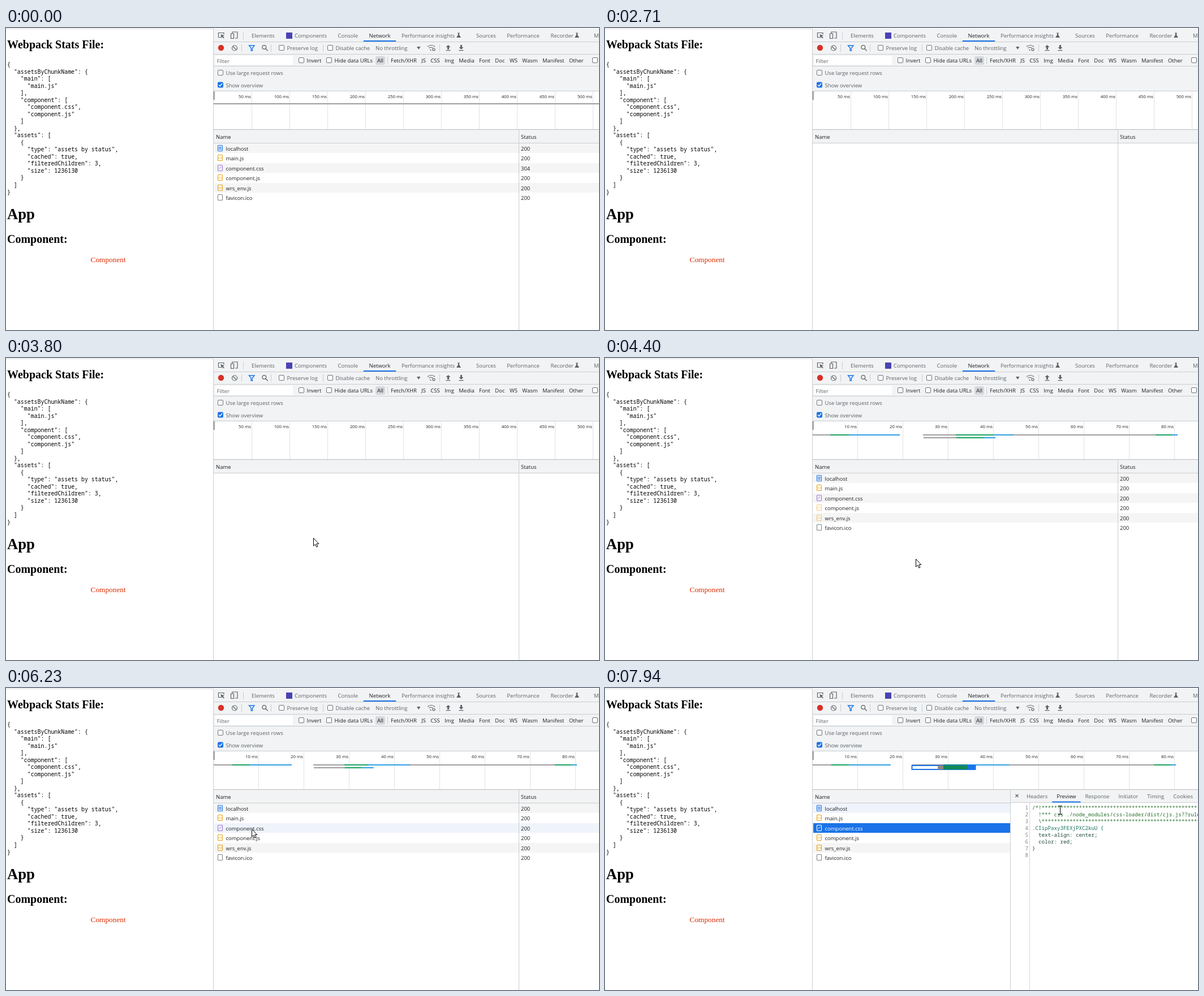
An HTML page that plays this animation: 1048 by 534 pixels, repeating every 8000 ms.

```html
<!DOCTYPE html>
<html lang="en">
<head>
<meta charset="utf-8">
<title>Network panel</title>
<style>
  html, body { margin: 0; width: 100%; height: 100%; overflow: hidden; background: #fff; }
  svg { display: block; }
  text { font: 9.5px "Open Sans", "Noto Sans", "DejaVu Sans", sans-serif; fill: #202124; }
  .serif { font-family: "Liberation Serif", serif; fill: #000; }
  .h1 { font-size: 26.67px; font-weight: bold; }
  .h2 { font-size: 20px; font-weight: bold; }
  .red { font-size: 13.33px; fill: #dd2c00; }
  .mono { font: 9.93px "Noto Sans Mono", "DejaVu Sans Mono", monospace; fill: #000; }
  .code { font-size: 9.17px; }
  .comment { fill: #236e25; }
  .selector { fill: #17705c; }
  .rule { fill: #1d4a35; }
  .num { fill: #80868b; text-anchor: end; }
  .tick { font-size: 7.8px; text-anchor: end; }
  .tab { fill: #5f6368; }
  .white { fill: #fff; }
  .icon { fill: none; stroke: #5f6368; stroke-width: 1.2; }
</style>
</head>
<body>
<svg id="stage" width="1048" height="534" viewBox="0 0 1048 534"></svg>
<script>
const LOOP = 8000, LEFT = 367, RIGHT = 1048, DETAIL = 716;
const WAIT = '#9e9e9e', SERVER = '#1aa260', DOWNLOAD = '#2f9fe5';
const ACCENT = '#1a73e8', PANEL = '#f1f3f4', LINE = '#cacdd1', INK = '#5f6368';

const rect = (x, y, w, h, fill, extra = '') =>
  `<rect x="${x}" y="${y}" width="${w}" height="${h}" fill="${fill}" ${extra}/>`;
const text = (x, y, s, cls = '') => `<text x="${x}" y="${y}" class="${cls}">${s}</text>`;
const path = (d, extra = 'class="icon"') => `<path d="${d}" ${extra}/>`;
const filled = (d, color = INK) => path(d, `fill="${color}"`);
const stroked = (d, color, width = 1) =>
  path(d, `fill="none" stroke="${color}" stroke-width="${width}"`);
const ring = (x, y, r) => `<circle cx="${x}" cy="${y}" r="${r}" class="icon"/>`;
const range = (n, fn) => Array.from({ length: n }, (_, i) => fn(i)).join('');

const pen = document.createElement('canvas').getContext('2d');
pen.font = '9.5px "Open Sans", "Noto Sans", sans-serif';

// Sets labels side by side; an active one gets a line under it.
function flow(x, y, gap, labels, cls, active, lineY) {
  return labels.map(label => {
    const width = pen.measureText(label).width, on = label === active;
    const out = text(x, y, label, on ? '' : cls) +
      (on ? rect(x - gap / 2, lineY, width + gap, 2, ACCENT) : '');
    x += width + gap;
    return out;
  }).join('');
}

function mono(x, y, s, advance, cls = '') {
  const body = s.trimStart();
  return text(x + (s.length - body.length) * advance, y, body, 'mono ' + cls);
}

const stats = JSON.stringify({
  assetsByChunkName: { main: ['main.js'], component: ['component.css', 'component.js'] },
  assets: [{ type: 'assets by status', cached: true, filteredChildren: 3, size: 1236130 }]
}, null, 2).split('\n');

const stars = '*'.repeat(60);
const css = `/*!${stars}
  !*** css ./node_modules/css-loader/dist/cjs.js??ruleSet[1].rules[1]
  \\${stars}
.CIipPaxy3FEXjPXC2kuU {
  text-align: center;
  color: red;
}
`.split('\n');

function page() {
  return rect(0, 1, LEFT, 1, '#dcdcdc') +
    text(2, 36, 'Webpack Stats File:', 'serif h2') +
    stats.map((s, i) => mono(2, 68 + i * 12.53, s, 5.96)).join('') +
    text(2, 338, 'App', 'serif h1') +
    text(2, 380, 'Component:', 'serif h2') +
    text(149.5, 414, 'Component', 'serif red');
}

const flask = x => filled(`M${x - 2} 8.5h4v1h-1v2.5l3 5h-8l3-5v-2.5h-1z`);
const separator = (x, y) => rect(x, y, 1, 13, LINE);
const arrow = (x, y, up) =>
  filled(`M${x} ${y}l4 ${4 * up}h-2.5v${4 * up}h-3v${-4 * up}h-2.5zM${x - 4} 39h8v1.3h-8z`);

function checkbox(x, y, label, cls = 'tab', on = false) {
  return rect(x + .5, y + .5, 9, 9, on ? ACCENT : '#fff', `rx="1.5" stroke="${on ? ACCENT : '#6f7377'}"`) +
    (on ? stroked(`M${x + 2} ${y + 5}l2.2 2.3 4-4.8`, '#fff', 1.4) : '') +
    text(x + 14.5, y + 9, label, cls);
}

const tabs = () =>
  path('M380 16.5h-4.5v-8h9.5v3') +
  filled('M379.5 11l6.5 2.6-2.7 1 2.5 2.7-1.2 1.1-2.5-2.7-1.3 2.5z') +
  path('M400 9.5v-2.5h9v11h-4M397.5 10h5v8.5h-5z') + separator(419, 7) +
  flow(434, 16.5, 19.5, ['Elements'], 'tab') + rect(495, 8, 11, 11, '#4a43b4') +
  flow(510, 16.5, 19.5, ['Components', 'Console', 'Network', 'Performance insights'], 'tab', 'Network', 22) +
  flask(800) + flow(831, 16.5, 19.5, ['Sources', 'Performance', 'Recorder'], 'tab') + flask(1009) +
  text(1039, 16.5, 'M', 'tab');

const controls = () =>
  '<circle cx="380" cy="35" r="5.2" fill="#d93025"/>' +
  ring(404, 35.5, 4.5) + path('M401 32.5l6 6') + separator(416, 29) +
  stroked('M429.5 31h9.5l-3.6 4.6v4.4h-2.2v-4.4z', ACCENT, 1.4) +
  ring(456.3, 34, 3.4) + path('M458.8 36.5l4 4') + separator(468, 29) +
  checkbox(482, 30, 'Preserve log') + separator(560, 29) +
  checkbox(568, 30, 'Disable cache') + text(653, 39, 'No throttling', 'tab') +
  filled('M726 33h6.5l-3.2 5z') +
  path('M745 33q6.5-5 13 0M747.5 35.5q3.5-2.5 7 0M749.5 38l2 2') + ring(756, 38, 2) +
  separator(766, 29) + arrow(781.5, 30, 1) + arrow(804.5, 38, -1);

const filters = () =>
  rect(370, 49, 137, 16, '#fff') + text(372.5, 61.5, 'Filter', 'tab') +
  checkbox(517, 52, 'Invert', '') + checkbox(566, 52, 'Hide data URLs', '') +
  rect(653, 50, 17, 15, '#d5d8dc', 'rx="3"') + text(656, 61, 'All') + separator(674, 51) +
  flow(680, 61, 8.4, ['Fetch/XHR', 'JS', 'CSS', 'Img', 'Media', 'Font', 'Doc', 'WS', 'Wasm', 'Manifest', 'Other']) +
  checkbox(1036, 52, '');

const toolbars = () =>
  rect(LEFT, 1, 681, 111, PANEL) + [24, 46, 67].map(y => rect(LEFT, y, 681, 1, LINE)).join('') +
  tabs() + controls() + filters() +
  checkbox(374, 74, 'Use large request rows') + checkbox(374, 95.5, 'Show overview', 'tab', true);

// One lane of the overview: durations cycle through wait, server, download.
function lane(y, x, durations) {
  return durations.map((w, i) => {
    const bar = rect(x, y - 1, w, 2, [WAIT, SERVER, DOWNLOAD][i % 3]);
    x += w;
    return bar;
  }).join('');
}

const sum = list => list.reduce((a, b) => a + b, 0);

// The document, then two parallel files, then a late one that ends at `end`.
function trace({ lead, doc, start, main, end, split }) {
  const grey = lead ? lane(134, LEFT, [lead]) : '';
  if (!doc) return grey;
  const [wait, server] = main;
  const second = [wait, server * .73, 20];
  const tail = [29, 10];
  const first = split ? second : main;
  const late = [end - start - sum(first) - sum(tail), ...tail];
  return grey + lane(136, LEFT, doc) +
    lane(136, start, split ? main : [...main, ...late]) +
    lane(141, start + 1, split ? [...second, ...late] : second);
}

function marked({ start, main: [wait, server] }) {
  return rect(start - 1.5, 136, 114, 9, ACCENT) + rect(start + .5, 138, wait - 10, 5, '#fff') +
    rect(start + wait - 10, 137, 10, 7, '#888') + rect(start + wait, 137, server, 7, '#128a55');
}

function overview({ load, done, selected }) {
  const { step, unit } = done ? load : loads[0];
  const ticks = range(11, i => {
    const x = Math.floor(LEFT + (i + 1) * step);
    return rect(x, 112, 1, 67, '#e2e2e2') + text(x - 1, 124, `${(i + 1) * unit} ms`, 'tick');
  });
  return rect(LEFT, 111, 681, 1, LINE) + ticks + (done ? trace(load) : '') +
    (selected ? marked(load) : '') +
    rect(LEFT, 112, 1.5, 15, '#777') + rect(LEFT, 179, 681, 1, '#b8bbbf');
}

const rowTop = i => Math.round(203.5 + i * 17.5);

function fileIcon(name, y, on, stale) {
  const ext = name.split('.')[1];
  const color = on ? '#fff' : { js: '#e8a317', css: '#9a7bd8' }[ext] || (name === 'localhost' ? ACCENT : '#80868b');
  const glyph = {
    js: `M377.7 ${y + 4}l-1.5 1.7 1.5 1.7m1.8-3.4l1.5 1.7-1.5 1.7`,
    css: `M376.5 ${y + 7.5}l4-4.5`
  }[ext] || (name === 'localhost' ? `M376 ${y + 3.5}h5m-5 2h5m-5 2h5` : '');
  return `<g opacity="${stale ? .55 : 1}">` +
    rect(374.5, y + .5, 8, 10, 'none', `rx="1" stroke="${color}" stroke-width="1.1"`) +
    stroked(glyph, color) + '</g>';
}

function table({ load, shown, selected, detail }, hover) {
  const { cached = [], stale = [] } = load;
  const body = load.files.slice(0, shown).map((name, i) => {
    const y = rowTop(i), on = selected && name === 'component.css', cls = on ? 'white' : '';
    const bg = on ? ACCENT : i === hover ? '#eff3fb' : i % 2 ? '#fff' : '#f5f5f5';
    return rect(LEFT + 1, y, 680, rowTop(i + 1) - y, bg) +
      fileIcon(name, y + 3, on, stale.includes(name)) +
      text(388.5, y + 12.5, name, cls) +
      text(910, y + 12.5, cached.includes(name) ? 304 : 200, cls);
  }).join('');
  return rect(LEFT, 180, 681, 23, PANEL) + rect(LEFT, 203, 681, 1, LINE) +
    text(371, 195.5, 'Name') + text(910, 195.5, 'Status') +
    body + rect(906, 180, 1, 354, LINE) + (detail ? preview() : '');
}

function preview() {
  const code = css.map((s, i) => {
    const y = 215 + i * 12, cls = i < 3 ? 'comment' : s.startsWith('.') ? 'selector' : 'rule';
    return text(748, y, i + 1, 'mono code num') + mono(755, y, s, 5.5, 'code ' + cls);
  }).join('');
  return rect(DETAIL, 180, 332, 354, '#fff') + rect(DETAIL, 180, 332, 22, PANEL) +
    rect(DETAIL, 202, 332, 1, LINE) + rect(DETAIL, 180, 1, 354, LINE) +
    path('M725.5 188l5 5m0-5l-5 5') +
    flow(745, 195, 16, ['Headers', 'Preview', 'Response', 'Initiator', 'Timing', 'Cookies'], 'tab', 'Preview', 200.5) +
    rect(750, 203, 1, 331, '#d5d7da') + code;
}

// Each page load fills the list in three steps over its span.
const files = ['localhost', 'main.js', 'component.css', 'component.js', 'wrs_env.js', 'favicon.ico'];
const loads = [
  { at: 0, step: 67, unit: 50, lead: 681, files, cached: ['component.css'] },
  { at: 2710, span: 290, step: 64, unit: 10, lead: 150, split: true,
    doc: [19, 33, 86], start: 549, main: [101, 23, 28], end: 950,
    files: ['localhost', '⊙ localhost', ...files.slice(1)],
    cached: ['main.js', 'component.css', 'component.js'], stale: ['component.css', 'wrs_env.js'] },
  { at: 3800, span: 300, step: 79.9, unit: 10,
    doc: [31, 33, 90], start: 562, main: [58, 67, 35], end: 1012,
    files, stale: ['component.js', 'wrs_env.js'] },
  { at: 5610, step: 79.9, unit: 10,
    doc: [33, 31, 74], start: 543, main: [55, 42, 74], end: 1009, files }
];

function sceneAt(t) {
  const load = loads.findLast(l => l.at <= t);
  const part = load.span ? Math.min(1, Math.floor((t - load.at) / load.span * 3) / 3) : 1;
  return {
    load, done: part === 1, shown: Math.round(part * load.files.length),
    selected: t >= 6730, detail: t >= 6830
  };
}

// Pointer moves: start, end and the point reached, in steps of about 100 ms
const moves = [
  [100, 600, 430, 382], [1600, 1600, 405, 384], [1700, 1700, 331, 366], [1900, 2000, 194, 20],
  [3200, 3200, 232, 89], [3300, 3300, 425, 246], [3400, 3500, 543, 318],
  [4400, 4400, 549, 355], [4500, 4600, 553, 379],
  [5210, 5310, 535, 365], [5410, 5920, 440, 229], [6020, 6230, 434, 249],
  [7430, 7740, 854, 270], [7840, 7940, 804.5, 216]
];

function pointerAt(t) {
  if (t < 100 || (t >= 2100 && t < 3200)) return null;
  let pos = [1044, 539];
  for (const [start, end, ...to] of moves) {
    if (t < start) break;
    const steps = Math.round((end - start) / 100) + 1;
    const pace = (end - start) / (steps - 1) || 1;
    const u = Math.min(1, (Math.floor((t - start) / pace) + 1) / steps);
    pos = pos.map((p, i) => p + (to[i] - p) * u);
  }
  return pos;
}

function drawPointer(pos, detail) {
  if (!pos) return '';
  const shape = detail && pos[0] > 750
    ? stroked('M-3-7.5h2.5l.5.5.5-.5h2.5M0-7v14M-3 7.5h2.5l.5-.5.5.5h2.5', '#000')
    : path('M.5.5v13.7l3.1-2.9 2.1 4.9 2.2-1-2.1-4.7h4z', 'fill="#fff" stroke="#000"');
  return `<g transform="translate(${pos})">${shape}</g>`;
}

// The highlight trails the pointer by half a row.
const hoverRow = pos => pos && pos[0] > LEFT ? Math.floor((pos[1] - 9 - 203.5) / 17.5) : -1;

const stage = document.getElementById('stage');
stage.innerHTML = page() + toolbars() +
  '<g id="net"></g>' + rect(366, 1, 1, 533, LINE) + '<g id="pointer"></g>';

const shownHtml = {};
function update(id, html) {
  if (shownHtml[id] === html) return;
  shownHtml[id] = html;
  document.getElementById(id).innerHTML = html;
}

function tick(now) {
  const t = now % LOOP, scene = sceneAt(t), pos = pointerAt(t);
  update('net', overview(scene) + table(scene, hoverRow(pos)));
  update('pointer', drawPointer(pos, scene.detail));
  requestAnimationFrame(tick);
}
tick(performance.now());
</script>
</body>
</html>
```
